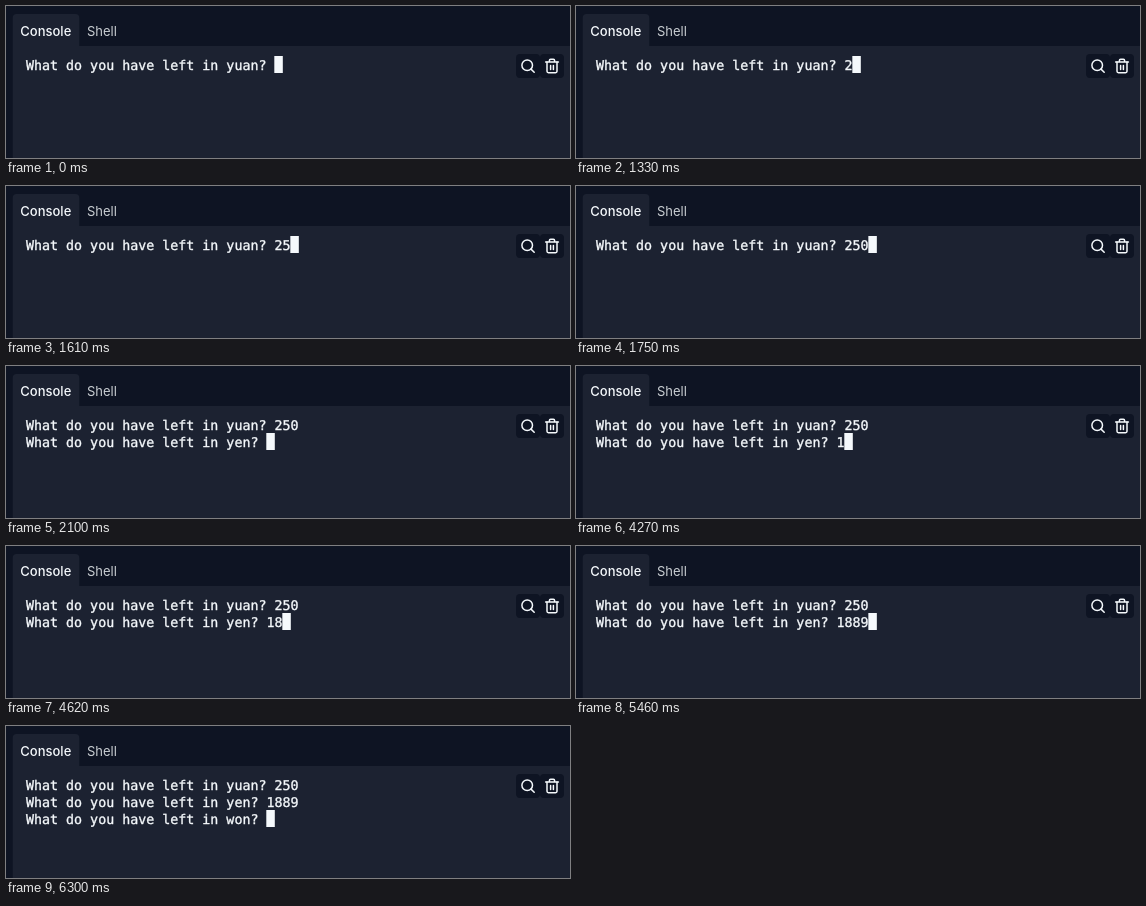
Recreate the animation shown at these times as an HTML page. Size 564 by 152 pixels, loop 8000 ms.

```html
<!DOCTYPE html>
<html lang="en">
<head>
<meta charset="utf-8">
<title>Console</title>
<style>
  html, body { margin: 0; width: 100%; height: 100%; overflow: hidden; background: #0e1423; }
  svg { display: block; }
  .tab { font: 13px Inter, "Open Sans", sans-serif; }
  .active { font-weight: 500; }
  .line {
    font: 13.32px "DejaVu Sans Mono", monospace; white-space: pre;
    fill: #f5f9fc; stroke: #f5f9fc; stroke-width: .35; text-rendering: geometricPrecision;
  }
  .icon { fill: none; stroke: #f5f9fc; stroke-width: 1.5; stroke-linecap: round; stroke-linejoin: round; }
</style>
</head>
<body>
<svg width="564" height="152" viewBox="0 0 564 152">
  <rect width="564" height="152" fill="#0e1423"/>
  <path d="M6.7 152V12a4 4 0 0 1 4-4H69.3a4 4 0 0 1 4 4V40H564V152Z" fill="#1c2231"/>
  <text class="tab active" x="14.3" y="29.5" fill="#f5f9fc">Console</text>
  <text class="tab" x="81" y="29.5" fill="#c9ced2">Shell</text>

  <g id="lines"></g>
  <rect id="cursor" width="8.5" height="17" fill="#f5f9fc"/>

  <g fill="#0e1423">
    <rect x="510" y="48" width="24" height="24" rx="4"/>
    <rect x="534" y="48" width="24" height="24" rx="4"/>
  </g>
  <g class="icon">
    <circle cx="521.2" cy="59.3" r="5.3"/>
    <path d="M525 63.1L528.2 66.3"/>
    <path d="M539.6 56H552.4M543.4 56V54.4a1.2 1.2 0 0 1 1.2-1.2H547.4a1.2 1.2 0 0 1 1.2 1.2V56"/>
    <path d="M541 56V65.3a1.4 1.4 0 0 0 1.4 1.4H549.6a1.4 1.4 0 0 0 1.4-1.4V56M544.6 59.4V63.4M547.4 59.4V63.4"/>
  </g>
</svg>
<script>
  const LOOP = 8000, LEFT = 20, TOP = 50, BASELINE = 13.7, CHAR = 8.01, ROW = 17;
  const ask = currency => `What do you have left in ${currency}? `;

  // [time in ms, text added to the console]
  const steps = [
    [0, ask("yuan")],
    [1330, "2"], [1610, "5"], [1750, "0"],
    [2100, "\n" + ask("yen")],
    [4270, "1"], [4620, "8"], [5180, "8"], [5460, "9"],
    [6300, "\n" + ask("won")]
  ];

  const group = document.getElementById("lines");
  const cursor = document.getElementById("cursor");
  const rows = [0, 1, 2].map(i => {
    const row = document.createElementNS("http://www.w3.org/2000/svg", "text");
    row.setAttribute("class", "line");
    row.setAttribute("x", LEFT);
    row.setAttribute("y", TOP + BASELINE + i * ROW);
    return group.appendChild(row);
  });

  let shown = null;
  function render(time) {
    const output = steps.filter(([at]) => at <= time).map(([, text]) => text).join("");
    if (output === shown) return;
    shown = output;
    const lines = output.split("\n");
    rows.forEach((row, i) => { row.textContent = lines[i] || ""; });
    const last = lines.length - 1;
    cursor.setAttribute("x", LEFT + lines[last].length * CHAR);
    cursor.setAttribute("y", TOP + last * ROW);
  }

  const start = performance.now();
  function tick() {
    render((performance.now() - start) % LOOP);
    requestAnimationFrame(tick);
  }
  tick();
</script>
</body>
</html>
```
